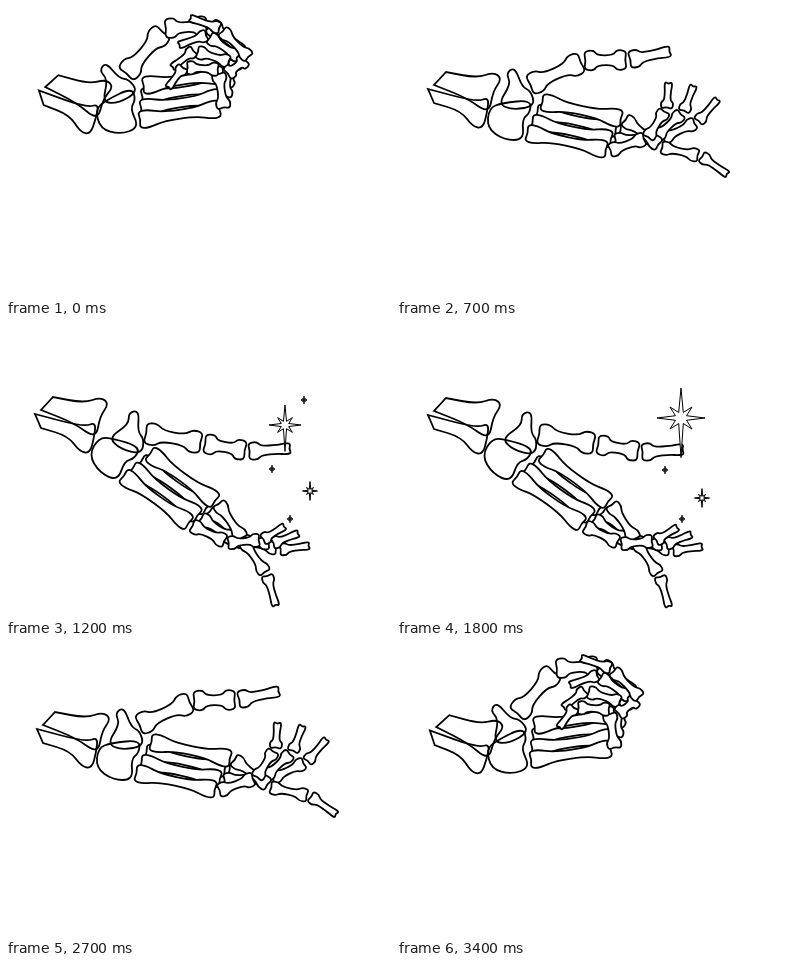
These frames come from a looping animation (385x292 px, 3.6 s). An HTML page with a canvas:

```html
<!DOCTYPE html>
<html>
<head>
<meta charset="utf-8">
<title>Skeleton hand</title>
<style>
html, body { margin: 0; width: 100%; height: 100%; overflow: hidden; background: #fff; }
canvas { display: block; }
</style>
</head>
<body>
<canvas width="385" height="292"></canvas>
<script>
const ctx = document.querySelector('canvas').getContext('2d');
const LOOP = 3600;
const CLOSED = 3400;
const WRIST = [83, 111];
const ELBOW = [60, 92];

// Four values in a row hold the poses: fist, half open, open, spread.
const palmTurn = [-20, 0, 0, 24];
const thumbBends = [[-29, -24, -24, -14], [45, 44, 23, 0], [42, 13, -11, -14]];

// Bend of the index finger at each joint, and how much the others add to it.
const fingerBends = [
  { index: [-30, -22, 25, 20], others: [-28, -25, -26, -14], growth: .7 },
  { index: [-97, -70, -24, 0], others: [17, 0, -13, -28], growth: .1 },
  { index: [-26, -12, 22, 18], others: [-28, -20, -45, -40], growth: .1 }
];

// The first two points of a forearm bone are sharp corners.
const forearm = [
  [[37, 79], [49, 66], [80, 72], [97, 66], [105, 73], [96, 85], [92, 108], [70, 92]],
  [[31, 83], [37, 97], [64, 105], [76, 121], [86, 122], [90, 107], [92, 91], [80, 96]]
];
const carpals = [
  [[118, 61], [109, 67], [114, 78], [101, 98], [116, 104], [138, 100], [134, 85], [125, 81]],
  [[92, 102], [105, 97], [134, 94], [133, 107], [125, 113], [127, 134], [107, 134], [90, 122]]
];

const mix = (a, b, f) => a + (b - a) * f;
const radians = degrees => degrees * Math.PI / 180;

function atPose(values, pose) {
  const i = Math.min(2, Math.floor(pose));
  return mix(values[i], values[i + 1], pose - i);
}

function smooth(points) {
  const mid = i => {
    const [ax, ay] = points[i], [bx, by] = points[(i + 1) % points.length];
    return [(ax + bx) / 2, (ay + by) / 2];
  };
  ctx.beginPath();
  ctx.moveTo(...mid(points.length - 1));
  points.forEach((point, i) => ctx.quadraticCurveTo(...point, ...mid(i)));
  ctx.closePath();
}

// A shaft with a rounded knob at either end, given by half widths.
function bone(length, start, shaft, end) {
  const side = [[-1, -start], [start, -start * 1.15], [length * .3, -shaft],
    [length * .7, -shaft], [length - end, -end * 1.15], [length + 1, -end]];
  const back = side.map(([x, y]) => [x, -y]).reverse();
  smooth([[1, 0], ...side, [length - 1, 0], ...back]);
  ctx.fill();
  ctx.stroke();
}

function chain(x, y, bones) {
  ctx.save();
  ctx.translate(x, y);
  bones.forEach(({ bend, length, width }, i) => {
    const isTip = i === bones.length - 1;
    ctx.rotate(radians(bend));
    bone(length - (isTip ? 0 : 4), width, width * .55, isTip ? width * .6 : width);
    ctx.translate(length, 0);
  });
  ctx.restore();
}

function drawFinger(k, pose) {
  const bends = fingerBends.map(({ index, others, growth }) =>
    atPose(index, pose) + atPose(others, pose) * k ** growth);
  const closed = Math.max(0, Math.min(1, 2 - pose));
  const lengths = [mix(46 - 2 * k, 27 + 4 * k, closed), 41 - 2 * k, 31 - 2 * k];
  chain(145 - 5 * k, 96 + 10.3 * k, [
    { bend: 12, length: 85, width: 8 },
    ...bends.map((bend, i) => ({ bend, length: lengths[i], width: 6.5 - i * .5 }))
  ]);
}

function drawThumb(pose) {
  chain(133, 79, thumbBends.map((bends, i) =>
    ({ bend: atPose(bends, pose), length: [60, 45, 41][i], width: 10 - i })));
}

function turnAbout([x, y], degrees) {
  ctx.translate(x, y);
  ctx.rotate(radians(degrees));
  ctx.translate(-x, -y);
}

function drawHand(pose, sway) {
  const fist = Math.max(0, 1 - pose), spread = Math.max(0, pose - 2);
  ctx.lineWidth = 1.8;
  ctx.save();
  ctx.translate(fist - 2 * spread + 2 * sway, 4 * fist + 5 * spread + sway);

  ctx.save();
  turnAbout(ELBOW, 5 * fist);
  forearm.forEach(([a, b, ...rest]) => {
    smooth([a, a, b, b, ...rest]);
    ctx.stroke();
  });
  ctx.restore();

  turnAbout(WRIST, atPose(palmTurn, pose));
  carpals.forEach(points => {
    smooth(points);
    ctx.stroke();
  });
  drawThumb(pose);
  [1, 2, 0, 3].forEach(k => drawFinger(k, pose));
  ctx.restore();
}

function drawSparkle(x, y, size, down = size * 1.25) {
  if (size < 1) return;
  ctx.beginPath();
  for (let i = 0; i < 16; i++) {
    const angle = i * Math.PI / 8;
    const arm = i === 4 ? down : i === 12 ? size * 1.25 : i % 4 ? size * .65 : size;
    const r = i % 2 ? size * .25 : arm;
    ctx.lineTo(x + r * Math.cos(angle), y + r * Math.sin(angle));
  }
  ctx.closePath();
  ctx.fill();
  ctx.stroke();
}

function drawSparkles(time, sway) {
  const size = 16 + 8 * sway;
  const pulse = Math.cos((time - 1380) / 600 * 2 * Math.PI) ** 3;
  ctx.lineWidth = 1;
  drawSparkle(279 + 5 * sway, 99 - 7 * sway, size, size * 1.65);
  drawSparkle(304 + sway, 165 + 7 * sway, 8 + 16 * pulse);
  drawSparkle(298, 74, 3 * (1 - sway));
  drawSparkle(266 + 2 * sway, 143 + sway, 3);
  drawSparkle(284 + sway, 193, 3);
}

// Steps of 100 ms, with longer holds while the hand is spread.
function held(time) {
  if (time < 1200 || time >= 2700) return Math.floor(time / 100) * 100;
  return [2500, 2300, 2000, 1800, 1500, 1400, 1200].find(start => start <= time);
}

// Closing runs the opening backwards.
function poseAt(time) {
  const t = Math.max(0, Math.min(time, CLOSED - time, 1200));
  if (t < 300) return t / 300;
  if (t < 700) return 1 + (t - 300) / 400;
  return 2 + Math.sin((t - 700) / 500 * Math.PI / 2);
}

function draw(now) {
  const time = held(now % LOOP);
  const sparkling = time >= 1200 && time < 2300;
  const sway = sparkling ? Math.sin((time - 1200) / 1200 * Math.PI) : 0;
  ctx.fillStyle = '#fff';
  ctx.fillRect(0, 0, 385, 292);
  drawHand(poseAt(time), sway);
  if (sparkling) drawSparkles(time, sway);
}

const begin = performance.now();
function tick() {
  draw(performance.now() - begin);
  requestAnimationFrame(tick);
}
tick();
</script>
</body>
</html>
```
